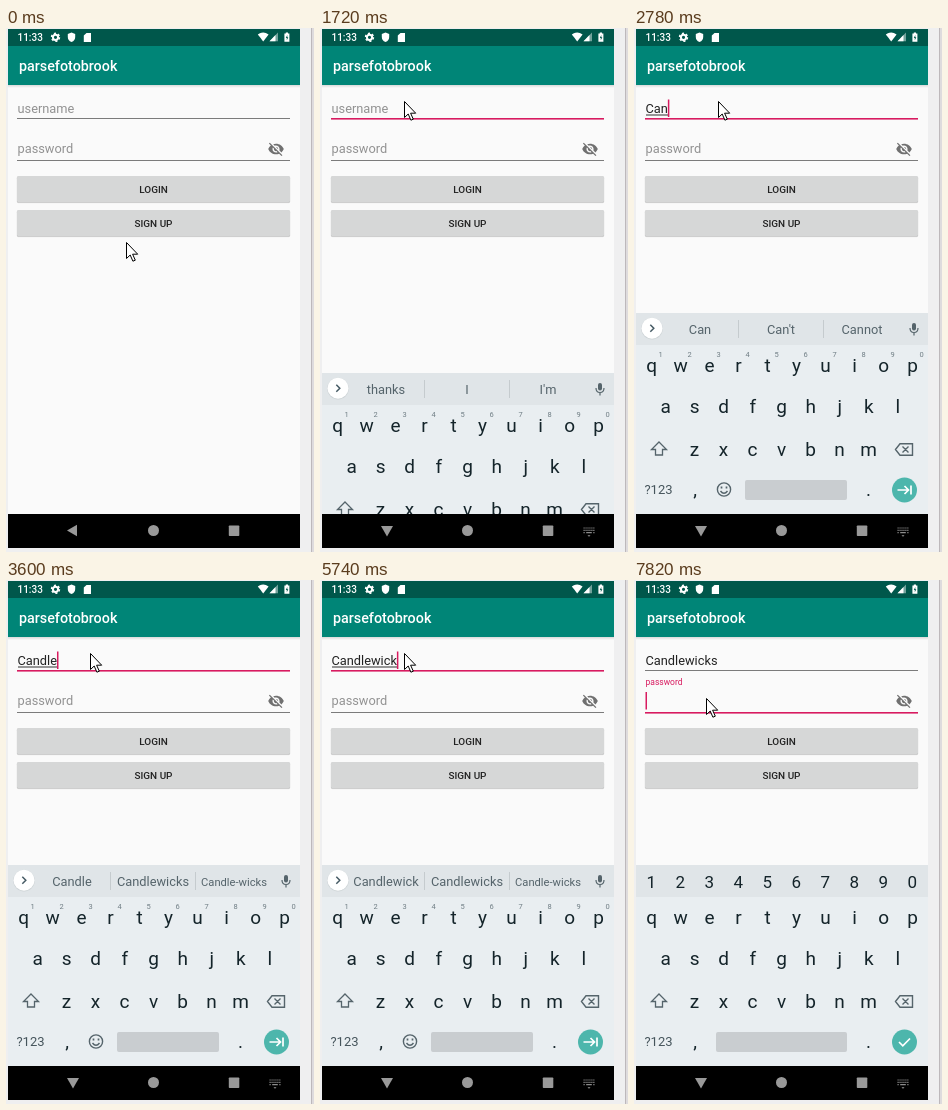
Recreate the animation shown at these times as an HTML page. Size 308 by 524 pixels, loop 8 s.

```html
<!DOCTYPE html>
<html lang="en">
<head>
<meta charset="utf-8">
<title>Login screen</title>
<style>
  html, body { margin: 0; width: 100%; height: 100%; overflow: hidden; background: #efeff0; }
  svg { display: block; width: 308px; height: 524px; font-family: Roboto, sans-serif; }
  text { white-space: pre; }
  .mid { text-anchor: middle; }
  .key { font-size: 19px; fill: #14242a; }
  .word { font-size: 12.8px; fill: #55646b; }
  .field { font-size: 12.8px; }
  .btn { font-size: 9.95px; font-weight: 500; fill: #222; }
</style>
</head>
<body>
<svg id="stage" viewBox="0 0 308 524">
  <defs>
    <linearGradient id="shade" x2="0" y2="1">
      <stop offset="0" stop-color="#000" stop-opacity=".13"/>
      <stop offset="1" stop-color="#000" stop-opacity="0"/>
    </linearGradient>
    <clipPath id="screen"><rect x="2" y="1" width="292" height="485"/></clipPath>
  </defs>
  <rect width="308" height="524" fill="#efeff0"/>
  <rect x="305" width="3" height="524" fill="#dedbdd"/>
  <path d="M305.500 0V524" stroke="#bdb8bb"/>
  <rect x="2" y="1" width="292" height="519" fill="#fafafa"/>
  <rect x="2" y="57" width="292" height="3" fill="url(#shade)"/>
  <rect x="2" y="18" width="292" height="39" fill="#008577"/>
  <rect x="2" y="1" width="292" height="17" fill="#00574b"/>

  <g id="status" fill="#fff">
    <text x="11.5" y="13" font-size="10" font-weight="500">11:33</text>
    <circle cx="49.5" cy="9.3" r="2.6" fill="none" stroke="#fff" stroke-width="2"/>
    <circle cx="49.5" cy="9.3" r="4" fill="none" stroke="#fff" stroke-width="1.4" stroke-dasharray="2.1 2.09"/>
    <path d="M65.500 4.600l3.700 1.500v3q0 3.500-3.700 5q-3.700-1.500-3.700-5v-3z"/>
    <path d="M80.500 5H85v9H77.800V7.600z"/>
    <path d="M251.800 6.400q5.400-4 10.800 0l-5.400 7z"/>
    <path d="M272 4.500v8.800h-8.500z" opacity=".45"/>
    <path d="M269.500 7v6.300h-6z"/>
    <path d="M279.800 4.500h2.200v1h1.400v8.300h-5V5.500h1.400z"/>
    <path d="M281.300 7l-1.500 3h1v2.200l1.500-3h-1z" fill="#00574b"/>
  </g>
  <text x="13" y="43" font-size="14.3" font-weight="500" fill="#fff">parsefotobrook</text>

  <text id="userHint" class="field" x="11.5" y="85" fill="#929292">username</text>
  <text id="user" class="field" x="11.5" y="85" fill="#222"></text>
  <rect id="compose" x="12" y="86.500" height="1" fill="#333"/>
  <rect id="line1" x="11" width="273"/>
  <text id="pass" x="11.5">password</text>
  <rect id="line2" x="11" width="273"/>
  <rect id="caret" width="1.5" height="17.500" fill="#d81b60"/>
  <path transform="translate(261.500 112.500) scale(.71)" fill="#707070" d="M12 7c2.760 0 5 2.240 5 5 0 .65-.13 1.260-.36 1.830l2.920 2.920c1.510-1.260 2.700-2.890 3.430-4.750-1.730-4.390-6-7.500-11-7.500-1.400 0-2.740.25-3.980.7l2.160 2.160C10.740 7.130 11.350 7 12 7zM2 4.270l2.740 2.740C3.080 8.300 1.780 10.020 1 12c1.730 4.390 6 7.500 11 7.500 1.550 0 3.030-.3 4.380-.84L19.730 22 21 20.730 3.270 3zM7.530 9.800l1.550 1.550c-.05.21-.08.43-.08.65 0 1.660 1.340 3 3 3 .22 0 .44-.03.65-.08l1.550 1.550c-.67.33-1.410.53-2.200.53-2.760 0-5-2.240-5-5 0-.79.2-1.530.53-2.200zM11.840 9.020l3.150 3.150.02-.16c0-1.660-1.340-3-3-3z"/>
  <g id="buttons"></g>

  <g clip-path="url(#screen)"><g id="board">
    <rect x="2" y="285" width="292" height="202" fill="#e9eef1"/>
    <rect x="2" y="285" width="292" height="32" fill="#e0e5e8"/>
    <g id="strip">
      <circle cx="18" cy="300.600" r="10.800" fill="#cdd3d6"/>
      <circle cx="18" cy="300.200" r="10.500" fill="#fff"/>
      <path d="M16.300 296.700l3.500 3.500-3.500 3.500" fill="none" stroke="#455a64" stroke-width="1.500"/>
      <path d="M104.500 292v18M189.500 292v18" stroke="#c5cbce"/>
      <rect x="278" y="295" width="4" height="7.500" rx="2" fill="#55646b"/>
      <path d="M276 300q0 4.500 4 4.500t4-4.500M280 304.500v3" fill="none" stroke="#55646b" stroke-width="1.200"/>
    </g>
    <g id="digits"></g>
    <g id="letters"></g>
    <path id="shift" d="M25 414l7.500 7.500h-4v5.500h-7V421.500h-4z" stroke="#55646b" stroke-width="1.300"/>
    <g fill="none" stroke="#55646b" stroke-width="1.400">
      <path d="M261.500 421.500l4.500-5.700h12.500v11.400H266zM268.500 418.500l6 6m0-6l-6 6"/>
      <g id="smile">
        <circle cx="90" cy="461.500" r="6.600"/>
        <path d="M86.500 463q3.500 4.500 7 0"/>
        <path d="M87.500 458.500v2m5-2v2" stroke-width="1.700"/>
      </g>
    </g>
    <text class="mid" x="24.500" y="466" font-size="13" fill="#45545b">?123</text>
    <text class="key mid" x="61" y="467.500">,</text>
    <text class="key mid" x="234.500" y="467.500">.</text>
    <rect id="space" y="452" height="20" rx="2" fill="#c9cdd0"/>
    <circle cx="270.500" cy="462" r="12.500" fill="#4db6ac"/>
    <path id="enter" fill="none" stroke="#fff" stroke-width="1.700"/>
  </g></g>

  <rect x="2" y="486" width="292" height="34"/>
  <g fill="#999">
    <path id="back"/>
    <circle cx="147.500" cy="502.500" r="5.500"/>
    <rect x="222.800" y="497.500" width="10.500" height="10.500" rx=".8"/>
    <g id="keysIcon" stroke="#8c8c8c" stroke-width="1.200">
      <path d="M263.500 500h11M263.500 502.300h11" stroke-dasharray="1.200 .75"/>
      <path d="M263.500 504.700h1.200m1.500 0h5.600m1.500 0h1.200"/>
      <path d="M267.500 507.300h3l-1.500 1.500z" stroke="none"/>
    </g>
  </g>
  <path id="mouse" d="M.500.500v16l3.700-3.500 2.700 6.200 2.400-1-2.700-6h5.100z" fill="#fff" stroke="#000"/>
</svg>
<script>
const LOOP = 8000, ACCENT = '#d81b60';
const $ = id => document.getElementById(id);

function add(parent, tag, attrs, label) {
  const node = document.createElementNS('http://www.w3.org/2000/svg', tag);
  set(node, attrs);
  if (label) node.textContent = label;
  return parent.appendChild(node);
}
function set(node, attrs) {
  for (const name in attrs) node.setAttribute(name, attrs[name]);
}
const show = (id, on) => $(id).style.display = on ? '' : 'none';

// Latest entry whose start time has passed
const latest = (list, t) => list.filter(e => e[0] <= t).pop();
const within = (t, spans) => spans.some(([a, b]) => t >= a && t < b);

[['LOGIN', 148], ['SIGN UP', 182]].forEach(([label, y]) => {
  const box = { x: 11, width: 273, height: 26, rx: 1.4 };
  add($('buttons'), 'rect', { ...box, y: y + .8, fill: '#cacaca', stroke: '#000', 'stroke-opacity': .06 });
  add($('buttons'), 'rect', { ...box, y, fill: '#d6d7d7' });
  add($('buttons'), 'text', { class: 'btn mid', x: 147.5, y: y + 16.7 }, label);
});

const letters = [];
[['qwertyuiop', 17.6, 344], ['asdfghjkl', 31.7, 385], ['zxcvbnm', 60.5, 427.5]].forEach(([row, x, y]) =>
  [...row].forEach((c, i) =>
    letters.push(add($('letters'), 'text', { class: 'key mid', x: x + i * 29, y }, c))));

const digits = [...'1234567890'].map(c => add($('digits'), 'text', { class: 'mid' }, c));
const words = [66, 147, 228].map(x => add($('strip'), 'text', { class: 'word mid', x, y: 306 }));

const pointer = [
  [0, 120, 214], [280, 112, 178], [400, 97, 132], [550, 94, 114], [670, 87, 86], [790, 84, 73],
  [6420, 81, 88], [6540, 75, 108], [6660, 72, 118]
];
const typing = [
  [0, ''], [2510, 'C'], [2630, 'Ca'], [2780, 'Can'], [2930, 'Cand'], [3360, 'Candl'],
  [3480, 'Candle'], [3850, 'Candlew'], [4130, 'Candles'], [5060, 'Candlew'], [5310, 'Candlewi'],
  [5590, 'Candlewic'], [5740, 'Candlewick'], [5890, 'Candlewicks']
];
// An empty first word repeats what is typed
const hints = [
  [0, 'thanks', 'I', "I'm"], [2510, '', 'Can', 'Could'], [2630, '', 'Can', 'Call'],
  [2780, '', "Can't", 'Cannot'], [2930, '', 'Candy', 'Candle'],
  [3480, '', 'Candlewicks', 'Candle-wicks'], [5890, '', 'Candle-wicks', 'Candle wicks']
];
const caretOn = [[940, 1470], [1990, 4690], [5060, 6420], [6780, 7320], [7820, LOOP]];

function fit(node, label, max) {
  if (node.textContent === label) return;
  node.textContent = label;
  node.style.fontSize = '';
  const width = node.getComputedTextLength();
  if (width > max) node.style.fontSize = 12.8 * max / width + 'px';
}

function underline(id, y, on) {
  set($(id), { y, height: on ? 1.6 : 1, fill: on ? ACCENT : '#7b7b7b' });
}

function drawForm(t) {
  const name = latest(typing, t)[1], second = t >= 6780;
  $('user').textContent = name;
  const width = name ? $('user').getComputedTextLength() : 0;
  show('userHint', !name);
  show('compose', name && t < 6930);
  set($('compose'), { width });
  underline('line1', 90, t >= 940 && !second);
  underline('line2', 132, second);

  const lift = t < 6780 ? 0 : t < 6930 ? .35 : 1;
  set($('pass'), {
    y: 125 - 20.5 * lift, 'font-size': 12.8 - 4.3 * lift, fill: second ? ACCENT : '#929292'
  });
  show('caret', within(t, caretOn));
  set($('caret'), { x: second ? 11.5 : 11.5 + width, y: second ? 112 : 71.5 });
}

function drawBoard(t) {
  const secret = t >= 6930, caps = t >= 2360 && t < 2510;
  show('board', t >= 1720);
  set($('board'), { transform: `translate(0 ${t < 1840 ? 60 : 0})` });
  show('strip', !secret);
  show('smile', !secret);
  letters.forEach(key => {
    const c = key.textContent;
    key.textContent = caps ? c.toUpperCase() : c.toLowerCase();
  });
  digits.forEach((d, i) => set(d, {
    x: 17.2 + i * 29 + (secret ? 0 : 9.5), y: secret ? 307.5 : 329,
    'font-size': secret ? 17 : 7.5, fill: secret ? '#14242a' : '#6f7d84'
  }));
  const row = latest(hints, t);
  words.forEach((w, i) => fit(w, row[i + 1] || latest(typing, t)[1], i === 1 ? 73 : 66));
  set($('shift'), { fill: caps ? '#55646b' : 'none' });
  set($('space'), { x: secret ? 82 : 111, width: secret ? 131 : 102 });
  set($('enter'), {
    d: secret ? 'M265 462l3.800 3.800 7.200-7.300' : 'M263.500 462h10.500M270.500 458l4 4-4 4M277 457.500v9'
  });
}

function draw(t) {
  drawForm(t);
  drawBoard(t);
  set($('back'), { d: t < 1470 ? 'M61 502.500l10-5.800v11.600z' : 'M61 498h12l-6 10.500z' });
  show('keysIcon', t >= 1470);
  const [, x, y] = latest(pointer, t);
  set($('mouse'), { transform: `translate(${x} ${y})` });
}

const start = performance.now();
function tick() {
  draw((performance.now() - start) % LOOP);
  requestAnimationFrame(tick);
}
tick();
</script>
</body>
</html>
```
